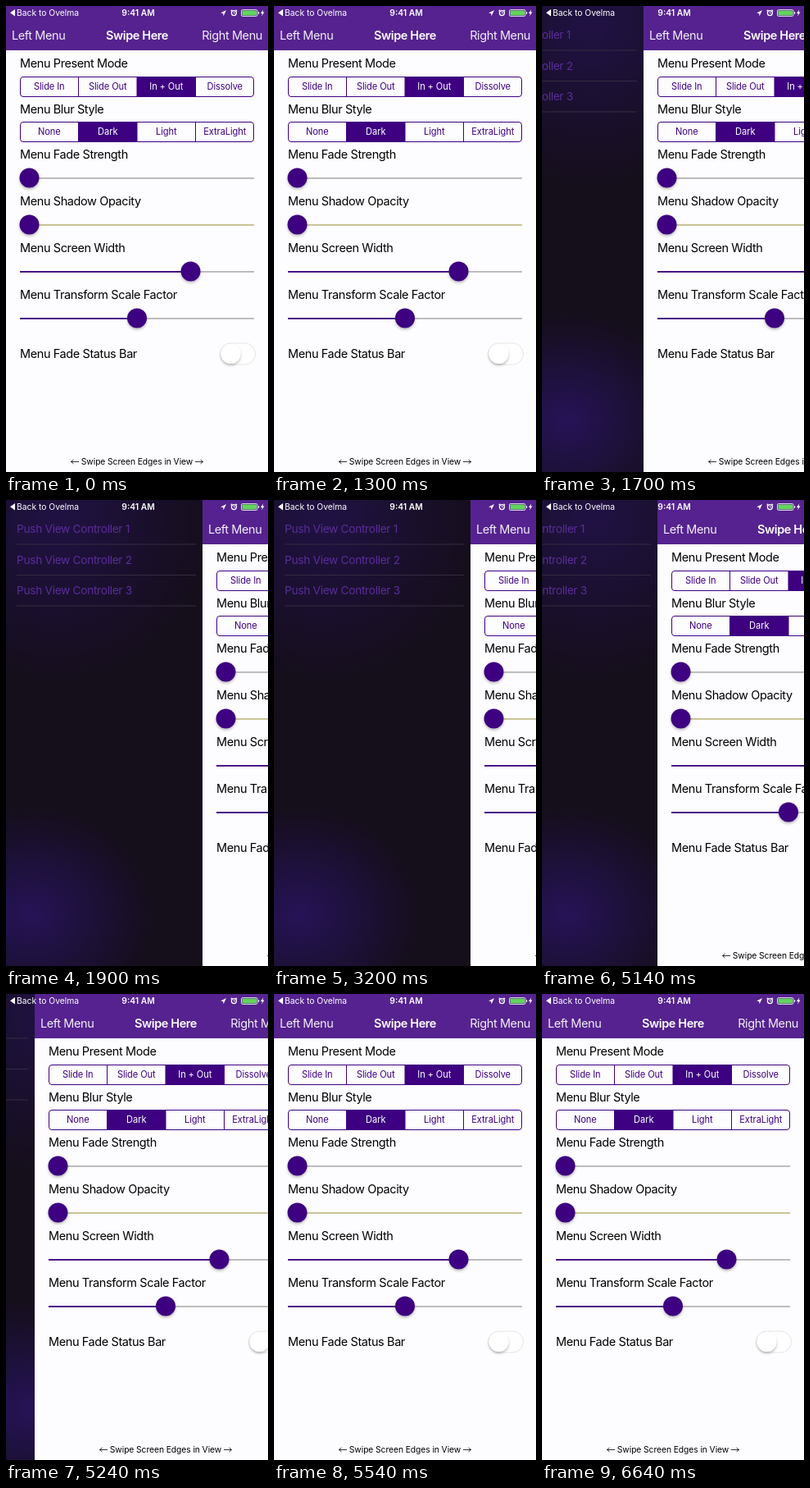
An HTML page for the animation above (6770 ms loop, 320 px wide and 568 px high).

```html
<!DOCTYPE html>
<html lang="en">
<head>
<meta charset="utf-8">
<title>Side menu</title>
<style>
  html, body { margin: 0; width: 100%; height: 100%; overflow: hidden; background: #fdfcff; }
  svg { display: block; width: 100vw; height: 100vh; font-family: Inter, Roboto, sans-serif; }
  .label, .nav { font-size: 14.5px; letter-spacing: -.4px; }
  .nav { fill: #f3eef8; }
  .title { font-weight: 600; fill: #fff; }
  .item { font-size: 13.7px; letter-spacing: -.3px; fill: #5a2d99; }
  .seg { font-size: 11.1px; letter-spacing: -.1px; text-anchor: middle; }
  .status { font-size: 10.3px; fill: #fff; }
  .hint { font-size: 10.3px; letter-spacing: -.08px; }
</style>
</head>
<body>
<svg viewBox="0 0 320 568">
  <defs>
    <filter id="soft" x="-50%" y="-50%" width="200%" height="200%">
      <feDropShadow dx="0" dy="2" stdDeviation="1.6" flood-color="#4a3a40" flood-opacity=".35"/>
    </filter>
    <radialGradient id="glow">
      <stop offset="0" stop-color="#2a1466"/>
      <stop offset="1" stop-color="#2a1466" stop-opacity="0"/>
    </radialGradient>
  </defs>
  <!-- The blurred backdrop stays put while the menu slides over it -->
  <rect width="320" height="568" fill="#150e1b"/>
  <ellipse cx="60" cy="20" rx="190" ry="200" fill="url(#glow)" opacity=".55"/>
  <ellipse cx="30" cy="505" rx="150" ry="130" fill="url(#glow)" opacity=".8"/>
  <g id="menu"></g>
  <g id="page"></g>
  <g id="bar" class="status">
    <path d="M5 8.3 11 4v8.6z"/>
    <text x="13" y="12">Back to Ovelma</text>
    <text x="161.5" y="12" text-anchor="middle" font-weight="600">9:41 AM</text>
    <path d="M262 8.6 269 5l-3.4 7.2-.5-3.3z"/>
    <g fill="none" stroke="#fff">
      <circle cx="278.4" cy="8.6" r="3" stroke-width="1.3"/>
      <path d="M278.4 7v1.8h1.4" stroke-width=".8"/>
      <path d="M274.6 6.4l1.6-1.8M282.2 6.4l-1.6-1.8" stroke-width="1.1"/>
      <rect x="287.5" y="4.5" width="19.5" height="8" rx="1.6" stroke-width=".8"/>
    </g>
    <rect x="288.5" y="5.5" width="17.5" height="6" rx=".7" fill="#62d55c"/>
    <path d="M308 7v3q1.3-.4 1.3-1.5T308 7z"/>
    <path d="M314.3 4.3 311 9h2l-1 3.6 3.5-5h-2z"/>
  </g>
</svg>
<script>
const LOOP = 6770, WIDTH = 240, SLIDE = 350;
const OPEN = 1522, FIRST_MOVE = 1570, CLOSE = 4983;
const INK = '#3d0080', TRACK = '#b6b6b6';
const menu = document.getElementById('menu');
const page = document.getElementById('page');

const text = (x, y, cls, str, extra = '') =>
  `<text x="${x}" y="${y}" class="${cls}" ${extra}>${str}</text>`;
const rect = (x, y, w, h, fill) =>
  `<rect x="${x}" y="${y}" width="${w}" height="${h}" fill="${fill}"/>`;

function segments(y, names, selected) {
  const w = 71.5;
  const cells = names.map((name, i) => {
    const x = 17 + i * w, on = i === selected;
    return (on ? rect(x, y, w, 24, INK) : '') +
      (i ? rect(x - .5, y, 1, 24, INK) : '') +
      text(x + w / 2, y + 15.7, 'seg', name, `fill="${on ? '#fff' : INK}"`);
  });
  return cells.join('') +
    `<rect x="17.5" y="${y}" width="285" height="24" rx="3.5" fill="none" stroke="${INK}"/>`;
}

function slider(y, x, track = TRACK) {
  return rect(17, y - 1, 286, 1.8, track) + rect(17, y - 1, x - 17, 1.8, INK) +
    `<circle cx="${x}" cy="${y - .5}" r="12" fill="${INK}" filter="url(#soft)"/>`;
}

const labels = [
  ['Present Mode', 75], ['Blur Style', 130.5], ['Fade Strength', 186],
  ['Shadow Opacity', 243], ['Screen Width', 300],
  ['Transform Scale Factor', 357], ['Fade Status Bar', 429]
];

page.innerHTML = rect(0, 0, 320, 568, '#fdfcff') + rect(0, 0, 320, 54, '#55228f') +
  text(7, 41, 'nav', 'Left Menu') +
  text(160, 41, 'nav title', 'Swipe Here', 'text-anchor="middle"') +
  text(313, 41, 'nav', 'Right Menu', 'text-anchor="end"') +
  labels.map(([name, y]) => text(17, y, 'label', 'Menu ' + name)).join('') +
  segments(86.5, ['Slide In', 'Slide Out', 'In + Out', 'Dissolve'], 2) +
  segments(141.5, ['None', 'Dark', 'Light', 'ExtraLight'], 1) +
  slider(210, 28.5) + slider(267, 28.5, '#c4bf8c') +
  slider(324, 225.5) + slider(381, 160) +
  `<rect x="261.5" y="411" width="43" height="26" rx="13" fill="#fefefe" stroke="#e6e6e2"/>
   <circle cx="274.5" cy="424" r="12" fill="#fff" filter="url(#soft)"/>
   <path d="M89 555.5h-9.5m3-2.5-3 2.5 3 2.5M231 555.5h9.5m-3-2.5 3 2.5-3 2.5" fill="none" stroke="#000" stroke-width=".8"/>` +
  text(160, 559, 'hint', 'Swipe Screen Edges in View', 'text-anchor="middle"');

menu.innerHTML = [1, 2, 3].map(n =>
  text(13, 2.5 + 37.5 * n, 'item', 'Push View Controller ' + n) +
  rect(13, 16 + 37.5 * n, 219, 1, '#352c40')).join('');

// Ease-in-out, cubic-bezier(.42, 0, .58, 1)
function ease(p) {
  if (p <= 0) return 0;
  if (p >= 1) return 1;
  let lo = 0, hi = 1, s;
  for (let i = 0; i < 20; i++) {
    s = (lo + hi) / 2;
    const x = 3 * (1 - s) * s * (.42 * (1 - s) + .58 * s) + s ** 3;
    if (x < p) lo = s; else hi = s;
  }
  return s * s * (3 - 2 * s);
}

// About 30 pictures a second: 0, 40 and 70 ms in every 100
function snap(t) {
  const m = t % 100;
  return t - m + (m < 40 ? 0 : m < 70 ? 40 : 70);
}

function draw(now) {
  const t = snap(now % LOOP);
  const open = t < FIRST_MOVE ? 0 : ease((t - OPEN) / SLIDE) - ease((t - CLOSE) / SLIDE);
  const x = Math.round(open * WIDTH);
  page.setAttribute('transform', `translate(${x})`);
  menu.setAttribute('transform', `translate(${x - WIDTH})`);
}

const start = performance.now();
function tick() {
  draw(performance.now() - start);
  requestAnimationFrame(tick);
}
tick();
</script>
</body>
</html>
```
